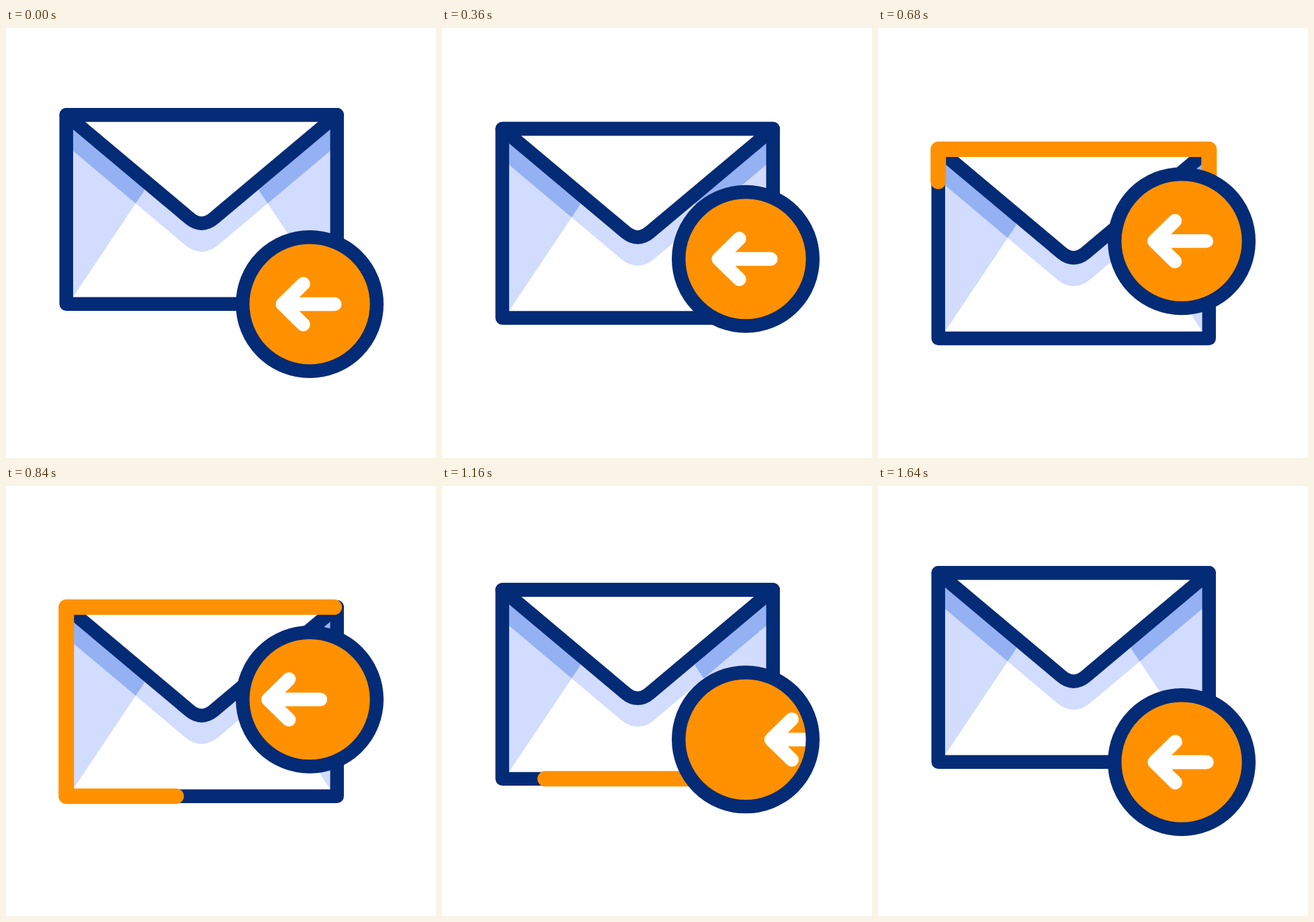
Write an HTML page that moves like this. It is 640 px wide and 640 px high and loops after 2 s.

```html
<!DOCTYPE html>
<html lang="en">
<head>
<meta charset="utf-8">
<title>Incoming mail</title>
<style>
  html, body { margin: 0; width: 100%; height: 100%; overflow: hidden; background: #fff; }
  svg { display: block; width: 100vw; height: 100vh; }
  .navy { stroke: #042b76; stroke-width: 20.4; }
  .light { fill: #d2dcff; stroke: #d2dcff; }
  .mid { fill: #94b1f3; stroke: #94b1f3; }
</style>
</head>
<body>
<svg viewBox="0 0 640 640" stroke-linejoin="round" stroke-linecap="round">
  <defs>
    <path id="sides" d="M89.7 129V415.4L206 241.5 150 129ZM492.7 129V415.4L376.4 241.5 432.4 129Z"/>
    <path id="shade" d="M89.7 129.3V161L273.2 315.2Q291.2 330.3 309.2 315.2L492.7 161V129.3Z"/>
    <clipPath id="inside"><rect x="89.7" y="129.3" width="403" height="281.4"/></clipPath>
    <clipPath id="sideClip"><use href="#sides"/></clipPath>
    <clipPath id="disc"><circle r="90"/></clipPath>
  </defs>

  <g id="mail">
    <g clip-path="url(#inside)">
      <rect x="89.7" y="129.3" width="403" height="281.4" fill="#fff"/>
      <use href="#sides" fill="#d2dcff"/>
      <use href="#shade" class="light" stroke-width="20.4"/>
      <g clip-path="url(#sideClip)"><use href="#shade" class="mid" stroke-width="20.4"/></g>
    </g>
    <path class="navy" fill="#fff" d="M89.7 129.3L273.2 283.2Q291.2 298.3 309.2 283.2L492.7 129.3Z"/>
    <rect class="navy" x="89.7" y="129.3" width="403" height="281.4" fill="none"/>
    <path id="trace" fill="none" stroke="#ff9100" stroke-width="23"
      d="M492.7 329.3V129.3H89.7V410.7H492.7V329.3"/>
  </g>

  <g id="badge">
    <circle r="100" fill="#ff9100"/>
    <g clip-path="url(#disc)" fill="none" stroke="#fff" stroke-width="20.4">
      <path id="leaving" d="M-9.5-30.2L-40.4 0-9.5 30.2M-40.4 0H37.3"/>
      <path id="entering" d="M-9.5-30.2L-40.4 0-9.5 30.2M-40.4 0H37.3"/>
    </g>
    <circle class="navy" r="99.8" fill="none"/>
  </g>
</svg>
<script>
const LOOP = 2000, STEP = 40;
const PERIMETER = 2 * (403 + 281.4);
const $ = id => document.getElementById(id);
const mail = $('mail'), badge = $('badge'), trace = $('trace');
const leaving = $('leaving'), entering = $('entering');

// Curve with control points (x1, 0) and (x2, 1)
function ease(x1, x2) {
  return x => {
    if (x <= 0) return 0;
    if (x >= 1) return 1;
    let lo = 0, hi = 1;
    for (let i = 0; i < 30; i++) {
      const m = (lo + hi) / 2, n = 1 - m;
      if (3 * m * n * n * x1 + 3 * m * m * n * x2 + m * m * m < x) lo = m;
      else hi = m;
    }
    return lo * lo * (3 - 2 * lo);
  };
}
const mailUp = ease(.66, .25), mailDown = ease(.64, .23);
const badgeUp = ease(.65, .02), badgeDown = ease(.67, .11);
const soft = ease(1 / 3, 2 / 3);
const span = (t, from, to) => (t - from) / (to - from);
const shift = (el, x, y) => el.setAttribute('transform', `translate(${x.toFixed(2)} ${y.toFixed(2)})`);

function draw(t) {
  const up = span(t, 80, 720), down = span(t, 760, 1640);
  shift(mail, 0, 51.4 * (mailUp(up) - mailDown(down)));
  shift(badge, 452, 411 - 94 * (badgeUp(up) - badgeDown(down)));

  // One arrow slides out on the left, the next slides in from the right
  shift(leaving, down >= 1 ? 0 : -160 * mailUp(span(t, 640, 1280)), 0);
  shift(entering, 160 * (1 - mailDown(down)), 0);

  const head = PERIMETER * soft(span(t, 297, 1089));
  const tail = PERIMETER * soft(span(t, 639, 1464));
  const length = head - tail;
  trace.style.display = length > 0.5 ? '' : 'none';
  trace.setAttribute('stroke-dasharray', `${length.toFixed(2)} 3000`);
  trace.setAttribute('stroke-dashoffset', (-tail).toFixed(2));
}

const start = performance.now();
function tick() {
  const t = (performance.now() - start) % LOOP;
  draw(Math.floor(t / STEP) * STEP);
  requestAnimationFrame(tick);
}
draw(0);
requestAnimationFrame(tick);
</script>
</body>
</html>
```
